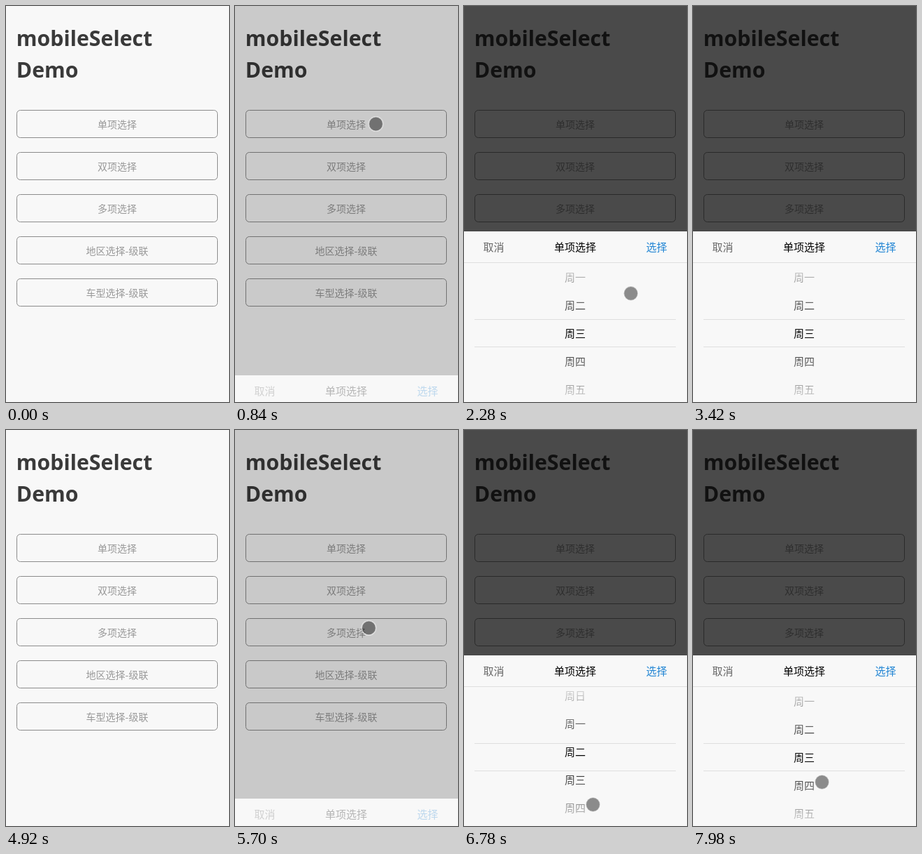
An HTML page for the animation above (8 s loop, 319 by 564 pixels).

```html
<!DOCTYPE html>
<html lang="zh-CN">
<head>
<meta charset="utf-8">
<title>mobileSelect Demo</title>
<style>
  html, body { margin: 0; width: 100%; height: 100%; overflow: hidden; background: #f8f8f8; }
  svg { display: block; width: 319px; height: 564px; }
  text { font: 15px "Noto Sans CJK SC", "Noto Sans CJK", "Noto Sans CJK JP", sans-serif; text-anchor: middle; }
  .title { font: 700 30.3px "Open Sans", "Noto Sans", sans-serif; text-anchor: start; fill: #3a3a3a; }
  .field rect { fill: none; stroke: #8c8c8c; }
  .field text { font-size: 14px; fill: #999; }
  .line { stroke: #dfdfdf; }
</style>
</head>
<body>
<svg viewBox="0 0 319 564">
  <defs>
    <linearGradient id="fade" x1="0" y1="0" x2="0" y2="1">
      <stop offset="0" stop-color="#f8f8f8" stop-opacity=".9"/>
      <stop offset=".5" stop-color="#f8f8f8" stop-opacity="0"/>
      <stop offset="1" stop-color="#f8f8f8" stop-opacity=".9"/>
    </linearGradient>
  </defs>
  <rect width="319" height="564" fill="#f8f8f8"/>
  <text class="title" x="14.8" y="57">mobileSelect</text>
  <text class="title" x="14.8" y="102">Demo</text>
  <g id="fields"></g>
  <g id="picker">
    <rect width="319" height="564" opacity=".7"/>
    <g id="panel">
      <rect y="321" width="319" height="245" fill="#f8f8f8"/>
      <g id="wheel"></g>
      <rect y="366" width="319" height="200" fill="url(#fade)"/>
      <path class="line" d="M15 446.5H303M15 485.5H303"/>
      <rect y="321" width="319" height="45" fill="#f8f8f8"/>
      <path class="line" d="M0 365.5H319"/>
      <text x="42.5" y="349" fill="#666">取消</text>
      <text x="159" y="349">单项选择</text>
      <text x="275.5" y="349" fill="#1e83d3">选择</text>
    </g>
  </g>
  <circle id="cursor" r="10.2" fill-opacity=".44" stroke="#fff" stroke-opacity=".55" stroke-width="1.6"/>
</svg>
<script>
const $ = id => document.getElementById(id);
const LOOP = 8000, STEP = 60, FADE = 400, HIDDEN = 320, ROW = 40;

$("fields").innerHTML = ["单项选择", "双项选择", "多项选择", "地区选择-级联", "车型选择-级联"]
  .map((label, i) => `<g class="field" transform="translate(0 ${i * 60})">
    <rect x="15.5" y="148.5" width="287" height="39" rx="5"/>
    <text x="159" y="174">${label}</text></g>`).join("");

$("wheel").innerHTML = [..."日一二三四五六"]
  .map((day, i) => `<text x="159" y="${392 + i * ROW}">周${day}</text>`).join("");

// Places the cursor visits
const edge = [315, 60], button = [201.5, 168], grip = [184.5, 541.5],
      drop = [184.5, 541.5 - ROW], away = [320, 271];

// Both rounds are the same gesture at a different pace
const rounds = [
  { from: 0, enter: 180, tap: 660, open: 749, leave: 840, grab: 1620, drop: 2160, exit: 2460, pace: 1.57, bow: -12 },
  { from: 4920, enter: 5220, tap: 5520, open: 5608, leave: 5640, grab: 6480, drop: 7980, exit: 8280, pace: .45, bow: -6 }
];

const progress = (t, a, b) => Math.min(1, Math.max(0, (t - a) / (b - a)));
const mix = (a, b, u) => a.map((v, i) => v + (b[i] - v) * u);

// CSS "ease": cubic-bezier(.25, .1, .25, 1)
function ease(x) {
  if (x <= 0) return 0;
  if (x >= 1) return 1;
  const curve = (p, q, s) => 3 * p * s * (1 - s) ** 2 + 3 * q * s * s * (1 - s) + s ** 3;
  let lo = 0, hi = 1;
  for (let i = 0; i < 24; i++) {
    const mid = (lo + hi) / 2;
    if (curve(.25, .25, mid) < x) lo = mid; else hi = mid;
  }
  return curve(.1, 1, lo);
}

function cursorAt(r, t) {
  if (t < r.leave) return mix(edge, button, progress(t, r.enter, r.tap));
  if (t < r.grab) {
    const u = progress(t, r.leave, r.grab) ** r.pace;
    const [x, y] = mix(button, grip, u);
    return [x + r.bow * Math.sin(Math.PI * u), y];
  }
  if (t < r.drop) return mix(grip, drop, progress(t, r.grab, r.drop));
  return mix(drop, away, progress(t, r.drop, r.exit));
}

function draw(t) {
  const r = rounds[t < rounds[1].from ? 0 : 1];
  const shift = HIDDEN * (1 - ease((t - r.open) / FADE));
  const scroll = -ROW * progress(t, r.grab, r.drop);
  const shown = t >= r.enter && t < r.exit;

  // The fade trails the slide slightly
  $("picker").setAttribute("opacity", ease((t - r.open - 17) / FADE));
  $("panel").setAttribute("transform", `translate(0 ${Math.round(shift)})`);
  $("wheel").setAttribute("transform", `translate(0 ${Math.round(scroll)})`);
  $("cursor").setAttribute("visibility", shown ? "visible" : "hidden");
  $("cursor").setAttribute("transform", `translate(${cursorAt(r, t).join(" ")})`);
}

const start = performance.now();
function tick() {
  const t = (performance.now() - start) % LOOP;
  draw(Math.floor(t / STEP) * STEP);
  requestAnimationFrame(tick);
}
tick();
</script>
</body>
</html>
```
